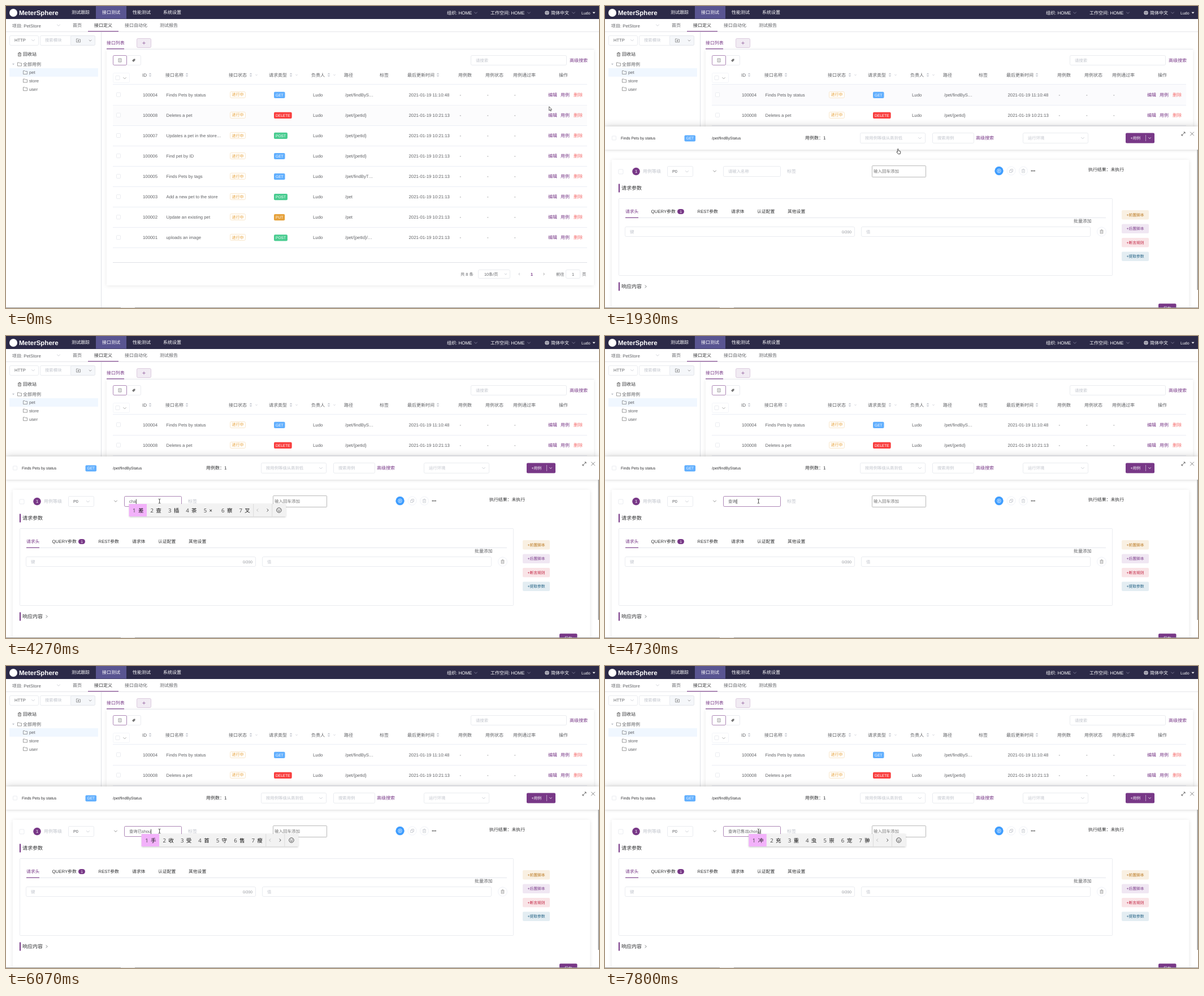
An HTML page with a canvas that plays this animation: 1049 px wide and 534 px high, repeating every 8000 ms.

```html
<!DOCTYPE html>
<html lang="zh-CN">
<head>
<meta charset="utf-8">
<title>接口测试</title>
<style>
html, body { margin: 0; width: 100%; height: 100%; overflow: hidden; background: #fff; }
canvas { display: block; width: 100vw; height: 100vh; }
</style>
</head>
<body>
<canvas id="stage" width="1049" height="534"></canvas>
<script>
const c = document.getElementById('stage').getContext('2d');
c.textRendering = 'geometricPrecision';
const LOOP = 8000;
const HAIRLINE = .6;
const SANS = '"Liberation Sans","Noto Sans CJK SC","Noto Sans CJK",sans-serif';
const IME = '"Open Sans","Noto Sans CJK SC","Noto Sans CJK",sans-serif';
const PURPLE = '#783887', TEXT = '#606266', DARK = '#303133', HINT = '#c0c4cc', EDGE = '#dcdfe6';
const USER = 'Ludo', SPACE = 'HOME';
const METHOD = { GET: '#61affe', DELETE: '#f93e3e', POST: '#49cc90', PUT: '#e6a23c' };
const clamp = v => Math.max(0, Math.min(1, v));

const rows = [
  [100004, 'Finds Pets by status', 'GET', '/pet/findByS…', '11:10:48'],
  [100008, 'Deletes a pet', 'DELETE', '/pet/{petId}'],
  [100007, 'Updates a pet in the store…', 'POST', '/pet/{petId}'],
  [100006, 'Find pet by ID', 'GET', '/pet/{petId}'],
  [100005, 'Finds Pets by tags', 'GET', '/pet/findByT…'],
  [100003, 'Add a new pet to the store', 'POST', '/pet'],
  [100002, 'Update an existing pet', 'PUT', '/pet'],
  [100001, 'uploads an image', 'POST', '/pet/{petId}/…']
];

// time, committed text, pinyin being composed, candidates
const typing = [
  [2600, '', ''],
  [3130, '', 'c'],
  [3530, '', ''],
  [4070, '', 'c', '才 从 吃 出 车 长 成'],
  [4200, '', 'ch', '吃 出 车 长 成 处 场'],
  [4270, '', 'cha', '差 查 插 茶 × 察 叉'],
  [4400, '', "cha'x", '查询 查下 查寻 查新 差些 茶香 查想'],
  [4470, '', "cha'xu", '查询 查许 查 差 插 茶 察'],
  [4530, '', "cha'xun", '查询 查寻 查 差 插 茶 察'],
  [4730, '查询', ''],
  [5000, '查询', 'y', '一 有 也 要 以 用 与'],
  [5070, '查询', 'yi', '已 一 以 义 ① I 易'],
  [5730, '查询已', ''],
  [5870, '查询已', 's', '是 上 说 时 三 所 四'],
  [5930, '查询已', 'sh', '是 上 说 时 事 使 市'],
  [6000, '查询已', 'sho', '手 收 受 首 守 售 瘦'],
  [6070, '查询已', 'shou', '手 收 受 首 守 售 瘦'],
  [6470, '查询已', "shou'c", '手册 收藏 收 手 守 受 首'],
  [6730, '查询已', "shou'ch", '售出 收成 手持 首创 收场 收储 收'],
  [7000, '查询已', "shou'chu", '售出 收储 收出 收 手 守 受'],
  [7270, '查询已售出', ''],
  [7470, '查询已售出', 'c', '才 从 吃 出 车 长 成'],
  [7530, '查询已售出', 'ch', '吃 出 车 长 成 处 场'],
  [7670, '查询已售出', 'cho', '宠物 充满 冲突 重复 冲 充 重'],
  [7730, '查询已售出', 'chon', '宠物 充满 冲突 重复 冲 充 重'],
  [7800, '查询已售出', 'chong', '冲 充 重 虫 崇 宠 翀']
];

const pointer = [
  [0, 960.5, 178], [70, 963, 176], [270, 983, 162], [470, 989.5, 156], [1670, 989.5, 156],
  [1730, 925, 168], [1930, 521.5, 251.5], [2130, 385, 278], [2330, 312, 290], [2530, 277, 292], [2800, 271.5, 292]
];

// y is the vertical centre of the line
function text(s, x, y, size = 7.8, color = TEXT, weight = 400, align = 'left', family = SANS) {
  c.font = `${weight} ${size}px ${family}`;
  c.fillStyle = color;
  c.textAlign = align;
  c.fillText(s, x, y + size * .37);
}
function rect(x, y, w, h, color) {
  c.fillStyle = color;
  c.fillRect(x, y, w, h);
}
function box(x, y, w, h, fill = '#fff', edge = EDGE, r = 2) {
  c.beginPath();
  c.roundRect(x + .5, y + .5, w - 1, h - 1, r);
  if (fill) { c.fillStyle = fill; c.fill(); }
  if (edge) { c.strokeStyle = edge; c.lineWidth = HAIRLINE; c.stroke(); }
}
function pill(x, y, w, h, color, r = 2) {
  c.beginPath();
  c.roundRect(x, y, w, h, r);
  c.fillStyle = color;
  c.fill();
}
function shadowed(blur, dy, alpha, draw) {
  c.save();
  c.shadowColor = `rgba(0,0,0,${alpha})`;
  c.shadowBlur = blur;
  c.shadowOffsetY = dy;
  draw();
  c.restore();
}
function path(d, x, y, stroke, fill, width = .8) {
  const p = new Path2D(d);
  c.save();
  c.translate(x, y);
  if (fill) { c.fillStyle = fill; c.fill(p); }
  if (stroke) { c.strokeStyle = stroke; c.lineWidth = width; c.stroke(p); }
  c.restore();
}
function disc(x, y, r, fill, edge) {
  c.beginPath();
  c.arc(x, y, r, 0, 7);
  if (fill) { c.fillStyle = fill; c.fill(); }
  if (edge) { c.strokeStyle = edge; c.lineWidth = .8; c.stroke(); }
}
const down = (x, y, color = HINT, w = 2.7) => path(`M${-w} ${-w / 2}L0 ${w / 2}L${w} ${-w / 2}`, x, y, color);
const right = (x, y, color = TEXT, w = 2.5) => path(`M${-w / 2} ${-w}L${w / 2} 0L${-w / 2} ${w}`, x, y, color);
const left = (x, y, color, w = 2.5) => path(`M${w / 2} ${-w}L${-w / 2} 0L${w / 2} ${w}`, x, y, color);
const check = (x, y, s = 8) => box(x - s / 2, y - s / 2, s, s, '#fff', EDGE, 1);
const folder = (x, y) => path('M-3.5 -3H-.8L.2 -2H3.5V3H-3.5Z', x, y, '#777', null, .7);
const trash = (x, y, color) => path('M-3 -2H3M-1 -2V-3.3H1V-2M-2.3 -2V3.2H2.3V-2M-.8 -.3V1.7M.8 -.3V1.7', x, y, color, null, .7);
const underline = (x, y, w) => rect(x, y, w, 1.1, PURPLE);
function field(x, y, w, h, hint, pad = 9) {
  box(x, y, w, h);
  text(hint, x + pad, y + h / 2, 7.35, HINT);
}
function badge(method, x, y) {
  c.font = `6.6px ${SANS}`;
  pill(x, y - 5.6, c.measureText(method).width + 6, 11.2, METHOD[method]);
  text(method, x + 3, y, 6.6, '#fff');
}

function drawHeader() {
  rect(0, 0, 1049, 23, '#2c2a48');
  rect(159, 0, 54, 22.5, '#595591');
  disc(13, 12, 7, '#fff');
  text('MeterSphere', 23, 12, 11.5, '#fff', 700);
  ['测试跟踪', '接口测试', '性能测试', '系统设置'].forEach((s, i) => text(s, 116 + 54 * i, 11, 8, '#fff'));
  text('组织: ' + SPACE, 780, 12, 8, '#fff');
  text('工作空间: ' + SPACE, 857, 12, 8, '#fff');
  [831, 925, 1004].forEach(x => down(x, 12, '#8d8ba5'));
  disc(957, 12, 3.6, '#fff');
  path('M-3.5 0H3.5M0 -3.5V3.5M-1 -3.4Q-3 0 -1 3.4M1 -3.4Q3 0 1 3.4', 957, 12, '#2c2a48', null, .6);
  text('简体中文', 964, 12, 8, '#fff');
  text(USER, 1018, 12, 7, '#fff');
  path('M-2.5 -1.3H2.5L0 1.6Z', 1040, 12, null, '#fff');

  text('项目: PetStore', 11, 35, 7.9);
  down(93, 34);
  [['首页', 118], ['接口定义', 156, DARK], ['接口自动化', 210], ['测试报告', 272]]
    .forEach(([s, x, color]) => text(s, x, 34, 8, color));
  rect(0, 45, 1049, 1, '#e6e6e9');
  underline(145, 44.2, 54);
}

function drawSidebar() {
  rect(168, 46, 1, 488, '#e0e2e7');
  box(6, 52, 52, 18);
  text('HTTP', 15, 60.5, 7.6);
  down(48, 60.5);
  box(60, 52, 98, 18);
  text('搜索模块', 69, 60.5, 7.35, HINT);
  box(114, 52, 44, 18, '#f5f7fa');
  folder(128, 61);
  path('M-1.5 .5H1.5M0 -1V2', 128, 61, '#777');
  down(149, 61, '#888', 2.3);
  trash(24, 85.5, '#444');
  text('回收站', 30, 85.5, 8, DARK);
  path('M-2 -1.2H2L0 1.4Z', 13, 103, null, HINT);
  folder(24, 103);
  text('全部用例', 30, 103, 8);
  rect(6, 110, 157, 15, '#f0f7ff');
  ['pet', 'store', 'user'].forEach((s, i) => {
    folder(34, 117.5 + 14.6 * i);
    text(s, 41, 117.5 + 14.6 * i, 7.7);
  });
}

function sorter(x, y) {
  path('M-2.5 -1L0 -3.3L2.5 -1ZM-2.5 1L0 3.3L2.5 1Z', x, y, null, HINT);
}

function drawTable(t) {
  shadowed(7, 1, .09, () => rect(178, 77, 862, 417, '#fff'));
  rect(178, 76, 862, 1, '#e8eaef');
  text('接口列表', 178, 65.5, 7.9, PURPLE);
  underline(178, 75.2, 31);
  box(231, 57, 26, 17, '#f1ebf3', '#c9afcf');
  path('M-2.7 0H2.7M0 -2.7V2.7', 244, 65.5, PURPLE, null, HAIRLINE);

  box(213, 87, 26, 18);
  box(189, 87, 25, 18, '#fff', PURPLE);
  path('M-2.5 -3H2.5V3H-2.5ZM-1 -1H1M-1 1H1', 201.5, 96, '#777', null, .7);
  path('M-3 .5L0 -2.5H2.5V0L-.5 3Z', 226, 96, null, '#777');
  field(822, 87, 170, 18, '请搜索');
  text('高级搜索', 997, 96, 8, PURPLE);

  box(189, 118, 30, 18, '#fff', '#ebeef5');
  check(197.5, 127);
  down(210, 127.5, '#999');
  [['ID', 241, 255], ['接口名称', 282, 320], ['接口状态', 394, 433, 443], ['请求类型', 465, 504, 514],
   ['负责人', 540, 571, 581], ['路径', 598], ['标签', 661], ['最后更新时间', 710, 764],
   ['用例数', 800], ['用例状态', 848], ['用例通过率', 897], ['操作', 978]].forEach(([s, x, sort, filter]) => {
    text(s, x, 121.7, 8, TEXT, 500);
    if (sort) sorter(sort, 121.7);
    if (filter) down(filter, 122, HINT, 1.6);
  });

  rect(189, 138, 839, 1, '#ebeef5');
  const hover = [t < 1800 ? clamp((t - 200) / 250) : clamp(1 - (t - 1800) / 250), t < 130 ? .35 : 0];
  rows.forEach(([id, name, method, url, clock = '10:21:13'], i) => {
    const y = 156.8 + 36.07 * i;
    if (hover[i]) rect(189, Math.round(y - 17.8), 839, 36, `rgba(245,247,250,${hover[i]})`);
    rect(189, Math.round(y + 18), 839, 1, '#ebeef5');
    check(199, y);
    text(id, 242, y);
    text(name, 283.5, y);
    box(396, Math.round(y - 6), 28, 12, '#fffdfa', '#f5dab1');
    text('进行中', 399.5, y, 7, '#e6a23c');
    badge(method, 474, y + .5);
    text(USER, 543, y);
    text(url, 600, y);
    text('2021-01-19 ' + clock, 712.5, y);
    [802.5, 851, 899].forEach(x => text('-', x, y));
    text('编辑', 959, y, 8, PURPLE);
    text('用例', 981, y, 8, PURPLE);
    text('删除', 1004, y, 8, '#f56c6c');
  });
  rect(189, 453, 839, 1, '#dfe1e6');

  text('共 8 条', 804, 474, 7.3);
  box(835, 466, 57, 16);
  text('10条/页', 846, 474, 7.2);
  down(884, 474, HINT, 2);
  left(908, 474, '#b0b3ba', 2);
  text('1', 930, 474, 7.3, PURPLE, 700, 'center');
  right(951.5, 474, '#888', 2);
  text('前往', 973, 474, 7.3);
  box(990, 466, 26, 16);
  text('1', 1003, 474, 7.3, TEXT, 400, 'center');
  text('页', 1019, 474, 7.3);
}

function drawDrawerHeader(count) {
  shadowed(5, 1, .15, () => rect(0, 213, 1049, 41, '#fff'));
  check(16, 233.5);
  text('Finds Pets by status', 28, 233.5, 6.8, DARK);
  badge('GET', 140.5, 234);
  text('/pet/findByStatus', 189, 233.5, 6.8, DARK);
  text('用例数：' + count, 354, 233.5, 8, DARK);
  field(451, 224, 116, 19, '按用例等级从高到低');
  down(557, 233.5);
  field(579, 224, 74, 19, '搜索用例');
  text('高级搜索', 656, 233.5, 8, PURPLE);
  field(739, 224, 116, 19, '运行环境');
  down(845, 233.5);
  pill(921, 224.5, 51, 18, PURPLE);
  text('+用例', 929.5, 233.5, 6.8, '#fff');
  rect(956, 228, .7, 11, '#d5bfda');
  down(963.5, 233.5, '#fff', 2.2);
  path('M-3 3L3 -3M.5 -3H3V-.5M-.5 3H-3V.5', 1023, 226, '#444');
  path('M-3.3 -3.3L3.3 3.3M3.3 -3.3L-3.3 3.3', 1038.5, 226, '#666');
}

function section(title, y) {
  rect(24, y - 7.5, 2, 15, PURPLE);
  text(title, 29, y, 9, DARK);
}

function drawCase(t) {
  shadowed(7, 1, .1, () => rect(12, 272, 1021, 290, '#fff'));
  check(28, 293, 9);
  disc(55, 292.5, 6.8, PURPLE);
  text('1', 55, 292.5, 7.5, '#fff', 400, 'center');
  text('用例等级', 67, 292.5, 8, HINT);
  box(110, 283, 46, 19);
  text('P0', 119, 292.5, 7.3);
  down(145, 292.5);
  down(194, 292, '#777');
  drawNameField(t);
  text('标签', 322, 292.5, 8, HINT);
  box(472, 282, 96, 21, '#fff', '#8c8c8c', 1);
  text('输入回车添加', 475, 292, 7.5, '#757575');
  disc(697, 291.5, 7.7, '#409eff');
  disc(697, 291.5, 3.2, null, '#fff');
  path('M-1 -1.5L1.6 0L-1 1.5Z', 697, 291.5, null, '#fff');
  [718.5, 740].forEach(x => disc(x, 291.5, 7.5, '#fff', '#ebeef5'));
  path('M-2.8 -1.2H1.2V3H-2.8ZM-1 -1.2V-3H3V1.2H1.2', 718.5, 291.5, HINT);
  trash(740, 291.5, HINT);
  [754.5, 757.2, 759.9].forEach(x => disc(x, 291.5, .9, '#333'));
  text('执行结果：未执行', 855, 289.5, 7.9, DARK);

  c.save();
  c.beginPath();
  c.rect(0, 310, 1049, 224 * clamp((t - 1130) / 270));
  c.clip();
  section('请求参数', 322);
  box(24, 340, 874, 137, '#fff', EDGE, 1);
  rect(36, 374, 850, 1, '#e4e7ed');
  underline(36, 373.7, 23);
  [['请求头', 36, PURPLE], ['QUERY参数', 81.5], ['REST参数', 163.5], ['请求体', 223], ['认证配置', 269], ['其他设置', 323]]
    .forEach(([s, x, color = DARK]) => text(s, x, 363.5, 7.8, color));
  pill(128, 359, 12, 9, PURPLE, 4.5);
  text('1', 134, 363.5, 6.6, '#fff', 400, 'center');
  text('批量添加', 829, 380, 7.9);
  field(35, 390, 407, 18, '键');
  text('0/200', 436, 399, 6.8, '#909399', 400, 'right');
  field(453, 390, 406, 18, '值');
  disc(878.5, 399, 8, '#fff', '#ebeef5');
  trash(878.5, 399, '#888');
  [['+前置脚本', '#f9f0e2', '#b8741a'], ['+后置脚本', '#f0e7f3', PURPLE],
   ['+断言规则', '#f9e4e7', '#c0203f'], ['+提取参数', '#e3edf2', '#1f5f82']].forEach(([s, bg, color], i) => {
    const y = 369 + 24.5 * i;
    pill(914, y - 8, 48, 16.4, bg);
    text(s, 938, y, 6.8, color, 400, 'center');
  });
  section('响应内容', 496);
  right(72, 496);
  pill(979, 526.3, 31.5, 17, PURPLE);
  text('保存', 994.5, 534.5, 7, '#fff', 400, 'center');
  c.restore();
}

function drawNameField(t) {
  const focus = clamp((t - 2530) / 200);
  const mix = (a, b) => Math.round(a + (b - a) * focus);
  box(209, 283, 102, 19, '#fff', `rgb(${mix(220, 120)},${mix(223, 56)},${mix(230, 135)})`);
  const state = typing.findLast(s => t >= s[0]);
  const value = state ? state[1] + state[2] : '';
  text(value || '请输入名称', 218, 292.5, 7.35, value ? TEXT : HINT);
  if (state && Math.floor((t - state[0]) / 530) % 2 === 0)
    rect(218 + (value ? c.measureText(value).width : 0), 288.5, .8, 8.5, '#222');
}

function drawCandidates(t) {
  const state = typing.findLast(s => t >= s[0]);
  if (!state || !state[3]) return;
  const words = state[3].split(' ');
  const itemWidth = w => 22.2 + 9.2 * w.length;
  let x = 217.6 + 7.35 * state[1].length;
  const total = words.reduce((sum, w) => sum + itemWidth(w), 58);
  shadowed(3, 1, .25, () => rect(x, 297, total, 22, '#f2f2f2'));
  words.forEach((w, i) => {
    if (!i) rect(x, 297, itemWidth(w), 22, '#f2b1fa');
    text(i + 1, x + 6.5, 308, 9.6, '#444', 400, 'left', IME);
    text(w, x + 16.3, 308, 9.5, '#111', 500, 'left', IME);
    x += itemWidth(w);
  });
  rect(x, 297, .8, 22, '#d5d5d5');
  rect(x + 33, 297, .8, 22, '#d5d5d5');
  left(x + 7.5, 308, '#aaa');
  right(x + 25.5, 308, '#222');
  disc(x + 45.5, 308, 4.2, null, '#222');
  path('M-2 .8Q0 3.2 2 .8', x + 45.5, 308, '#222');
  [44, 47].forEach(d => disc(x + d, 306.8, .6, '#222'));
}

function drawDrawer(t) {
  if (t < 930) return;
  const rest = 1 - clamp((t - 870) / 260);
  const loaded = t >= 1200;
  c.save();
  c.translate(0, 321 * rest * rest);
  shadowed(14, 1, .22, () => rect(0, 213, 1049, 330, '#fff'));
  if (loaded) drawCase(t);
  drawDrawerHeader(loaded ? 1 : 0);
  rect(1047.5, loaded ? 254 : 259, 1.5, loaded ? 248 : 20, '#9a9a9a');
  if (loaded) drawCandidates(t);
  c.restore();
}

function drawPointer(t) {
  const next = pointer.findIndex(k => k[0] > t);
  const b = pointer.at(next), a = next > 0 ? pointer[next - 1] : b;
  const p = a === b ? 0 : (t - a[0]) / (b[0] - a[0]);
  const x = a[1] + (b[1] - a[1]) * p, y = a[2] + (b[2] - a[2]) * p;
  if (t > 2330)
    path('M-1.8 -3.8Q0 -3.8 0 -3Q0 -3.8 1.8 -3.8M0 -3V3M-1.8 3.8Q0 3.8 0 3Q0 3.8 1.8 3.8', x, y, '#222');
  else if (t > 330 && t < 2000)
    path('M2.5 0Q3.4 0 3.4 1V3.4L6.2 4Q7.2 4.3 7 5.4L6.3 9H2.6L.3 6Q0 4.8 1 5L1.6 5.6V1Q1.6 0 2.5 0Z', x, y, '#222', '#fff');
  else
    path('M0 0V7L1.6 5.6L2.7 8L3.8 7.5L2.8 5.2H4.9Z', x, y, '#222', '#fff', .7);
}

function draw(now) {
  const t = Math.floor((now % LOOP + 4) * .015) / .015 + 5;
  rect(0, 0, 1049, 534, '#fff');
  drawTable(t);
  drawSidebar();
  drawHeader();
  drawDrawer(t);
  rect(0, 533, 1049, 1, '#979797');
  rect(203, 533, 25, 1, '#d4d4d4');
  drawPointer(t);
}

const start = performance.now();
function tick() {
  draw(performance.now() - start);
  requestAnimationFrame(tick);
}
tick();
</script>
</body>
</html>
```
